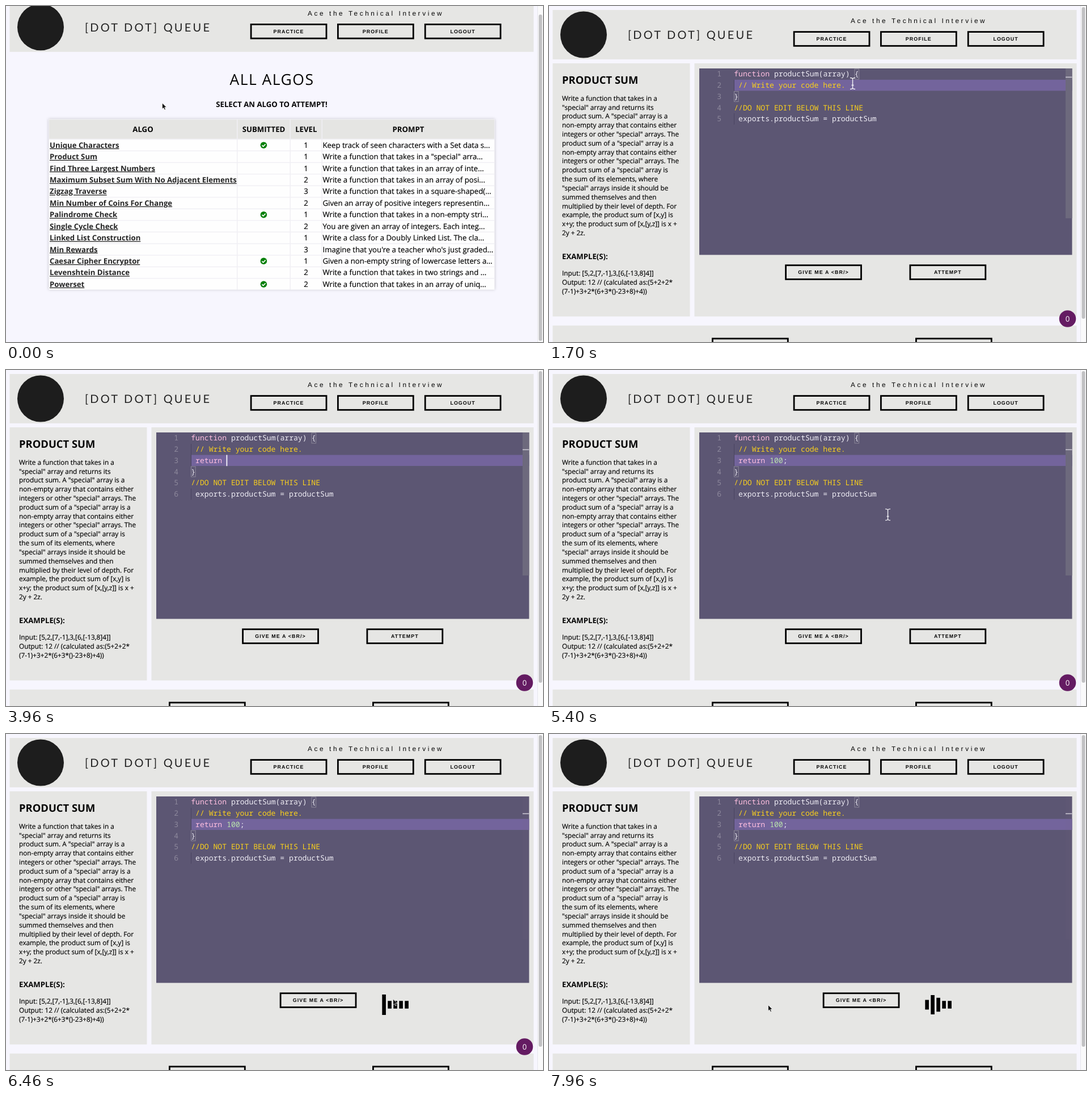
Recreate the animation shown at these times as an HTML page. Size 947 px wide and 592 px high, loop 8000 ms.

```html
<!DOCTYPE html>
<html lang="en">
<head>
<meta charset="utf-8">
<title>All Algos</title>
<style>
html, body { margin: 0; width: 100%; height: 100%; overflow: hidden; background: #f7f6fe; }
svg { display: block; width: 947px; height: 592px; }
text { font-family: "Open Sans", sans-serif; fill: #050505; text-rendering: geometricPrecision; }
.mid { text-anchor: middle; }
.bold { font-weight: 700; }
.body { font-size: 11.8px; }
.cell { font-size: 13.19px; }
.body, .cell:not(.bold) { stroke: #050505; stroke-width: .18px; }
.link { text-decoration: underline; fill: #262626; }
.title { font-size: 26.5px; letter-spacing: 1.5px; }
.h2 { font-size: 18.4px; }
.btn { font: 700 8.84px "Liberation Sans", sans-serif; letter-spacing: 1.1px; }
.slogan { font: 11.8px "Liberation Sans", sans-serif; letter-spacing: 3.61px; }
.brand { font: 20px Lato, sans-serif; letter-spacing: 3.2px; fill: #222; }
.code { font: 13.1px "Noto Sans Mono", monospace; }
.num { text-anchor: end; }
</style>
</head>
<body>
<svg id="stage" viewBox="0 0 947 592"></svg>
<script>
const LOOP = 8000;
const PANEL = '#e6e6e4';
const $ = id => document.getElementById(id);
const esc = s => s.replace(/&/g, '&amp;').replace(/</g, '&lt;');
const rect = (x, y, w, h, fill, more = '') =>
  `<rect x="${x}" y="${y}" width="${w}" height="${h}" fill="${fill}" ${more}/>`;
const text = (x, y, s, cls, more = '') =>
  `<text x="${x}" y="${y}" class="${cls}" ${more}>${esc(s)}</text>`;
const button = (x, y, label) =>
  rect(x + 1.4, y + 1.4, 132.9, 24.7, 'none', 'stroke="#000" stroke-width="2.8"') +
  text(x + 67.8, y + 17, label, 'btn mid');

const header = () =>
  rect(6.5, 7, 924, 87, PANEL) +
  '<circle cx="61" cy="50.5" r="41" fill="#1d1d1d"/>' +
  text(139, 58, '[DOT DOT] QUEUE', 'brand') +
  text(532, 30, 'Ace the Technical Interview', 'slogan') +
  button(430.7, 44.2, 'PRACTICE') + button(584, 44.2, 'PROFILE') + button(737.8, 44.2, 'LOGOUT');

const scrollbar = (y, h) =>
  rect(937, 0, 10, 592, '#fafafb') + rect(937, 0, 1, 592, '#e7e6ec') +
  rect(939.5, y, 6, h, '#c1c1c3', 'rx="3"');

// name, level, prompt, submitted
const algos = [
  ['Unique Characters', 1, 'Keep track of seen characters with a Set data s...', 1],
  ['Product Sum', 1, 'Write a function that takes in a "special" arra...'],
  ['Find Three Largest Numbers', 1, 'Write a function that takes in an array of inte...'],
  ['Maximum Subset Sum With No Adjacent Elements', 2, 'Write a function that takes in an array of posi...'],
  ['Zigzag Traverse', 3, 'Write a function that takes in a square-shaped(...'],
  ['Min Number of Coins For Change', 2, 'Given an array of positive integers representin...'],
  ['Palindrome Check', 1, 'Write a function that takes in a non-empty stri...', 1],
  ['Single Cycle Check', 2, 'You are given an array of integers. Each integ...'],
  ['Linked List Construction', 1, 'Write a class for a Doubly Linked List. The cla...'],
  ['Min Rewards', 3, "Imagine that you're a teacher who's just graded..."],
  ['Caesar Cipher Encryptor', 1, 'Given a non-empty string of lowercase letters a...', 1],
  ['Levenshtein Distance', 2, 'Write a function that takes in two strings and ...'],
  ['Powerset', 2, 'Write a function that takes in an array of uniq...', 1]
];
const columns = [[76, 331, 'ALGO'], [408.5, 92, 'SUBMITTED'], [502, 54.5, 'LEVEL'], [558, 303, 'PROMPT']];

const check = y =>
  `<circle cx="454.4" cy="${y}" r="5.8" fill="#07800a"/>` +
  `<path d="M451.4 ${y + .2}l2.2 2.2 4-4.2" fill="none" stroke="#fff" stroke-width="1.6"/>`;

function listPage() {
  let s = `<g transform="translate(0 -13.2)">${header()}</g>` +
    text(469, 139, 'ALL ALGOS', 'title mid') +
    text(468.5, 177.6, 'SELECT AN ALGO TO ATTEMPT!', 'cell bold mid') +
    rect(75, 199, 787, 300.5, '#f0eff4', 'filter="url(#soft)"');
  for (const [x, w, name] of columns)
    s += rect(x, 200.3, w, 33.5, '#e5e5e3') + text(x + w / 2, 222.2, name, 'cell bold mid');
  algos.forEach(([name, level, prompt, done], i) => {
    const y = 245.2 + 20.42 * i;
    for (const [x, w] of columns) s += rect(x, y - 9.6, w, 19, '#fefefe');
    s += text(77, y + 4.6, name, 'cell bold link') +
      text(529, y + 4.6, String(level), 'cell mid') +
      text(558.5, y + 4.6, prompt, 'cell') + (done ? check(y) : '');
  });
  return s + scrollbar(15, 575);
}

const prompt = `Write a function that takes in a
"special" array and returns its
product sum. A "special" array is a
non-empty array that contains either
integers or other "special" arrays. The
product sum of a "special" array is a
non-empty array that contains either
integers or other "special" arrays. The
product sum of a "special" array is
the sum of its elements, where
"special" arrays inside it should be
summed themselves and then
multiplied by their level of depth. For
example, the product sum of [x,y] is
x+y; the product sum of [x,[y,z]] is x +
2y + 2z.`;
const example = `Input: [5,2,[7,-1],3,[6,[-13,8]4]]
Output: 12 // (calculated as:(5+2+2*
(7-1)+3+2*(6+3*()-23+8)+4))`;
const lines = (y, s) => s.split('\n').map((l, i) => text(23, y + 15.82 * i, l, 'body')).join('');

const editorPage = () =>
  header() + rect(6.5, 101, 242, 446, PANEL) + rect(256.5, 101, 674, 446, PANEL) +
  rect(6.5, 563, 924, 40, PANEL) +
  text(23, 137.3, 'PRODUCT SUM', 'bold h2') + lines(166.7, prompt) +
  text(23, 445.8, 'EXAMPLE(S):', 'cell bold') + lines(475.4, example) +
  rect(265, 110, 657.5, 328.5, '#5c5673') + '<g id="code"></g>' +
  rect(911, 110, 11.5, 264, '#6d697d', 'id="slider"') +
  rect(911, 124.6, 11.5, 1.6, '#c9c6d2', 'id="mark"') +
  rect(0, 0, 1.7, 19.6, '#fff', 'id="caret"') +
  `<g id="give">${button(416.2, 455.4, 'GIVE ME A <BR/>')}</g>` +
  `<g id="attempt">${button(635.5, 455.4, 'ATTEMPT')}</g>` +
  '<path id="bars"/>' +
  button(287, 584.6, '') + button(646, 584.6, '') +
  '<g id="badge"><circle cx="914.5" cy="551" r="14.8" fill="#641b62"/>' +
  text(914.5, 555.6, '0', 'cell mid', 'style="fill:#fff;stroke:none"') + '</g>' +
  scrollbar(2, 549);

const cursors =
  '<path id="arrow" d="M0 0V10.4L2.4 8.3 4.1 12 5.9 11.2 4.3 7.6H7.6Z" fill="#111" stroke="#fff" stroke-width=".7"/>' +
  '<path id="hand" d="M-.9 .4Q0-.8 .9 .4V5L5 5.8Q6.4 6.2 6.2 8L5.3 12.6H-.4L-3 8.2Q-3.2 6.6-.9 8Z" fill="#fff" stroke="#222" stroke-width="1"/>' +
  '<path id="beam" d="M-4.5-10Q-1-10 0-8.5Q1-10 4.5-10M0-8.5V8.5M-4.5 10Q-1 10 0 8.5Q1 10 4.5 10M-2 3H2" fill="none" stroke="#f4f3f7" stroke-width="1.4"/>';

$('stage').innerHTML =
  '<defs><filter id="soft" x="-5%" y="-5%" width="110%" height="110%">' +
  '<feDropShadow dx="0" dy="0" stdDeviation="2.6" flood-opacity=".2"/></filter></defs>' +
  rect(0, 0, 947, 592, '#f7f6fe') +
  `<g id="list">${listPage()}</g><g id="editor">${editorPage()}</g><g id="mouse">${cursors}</g>`;

const PINK = '#ffbfe0', PALE = '#efedf5', GOLD = '#fad01c', LIME = '#b9e3ab';
const colX = c => 326.2 + 7.87 * c;
const lineY = i => 110.2 + 19.72 * i;
const typed = 'return 100;';
const keys = [3230, 3300, 3530, 3630, 3730, 3830, 3960, 4130, 4190, 4430, 4660];
const ENTER = 2830;

// token: column, string, colour
function codeMarkup(split, n) {
  const word = typed.slice(0, Math.min(n, 6));
  const rows = [
    [[0, 'function', PINK], [9, 'productSum(array)', PALE], [27, '{', PALE]],
    [[1, '// Write your code here.', GOLD]],
    [[0, '}', PALE]],
    [[0, '//DO NOT EDIT BELOW THIS LINE', GOLD]],
    [[1, 'exports.productSum = productSum', PALE]]
  ];
  if (split) rows.splice(2, 0, [
    [1, word, n > 5 ? PINK : PALE], [8, typed.slice(7, Math.min(n, 10)), LIME], [11, typed.slice(10, n), PALE]
  ]);
  const active = split ? 2 : 1;
  let s = rect(326, lineY(active), 596.5, 19.4, '#73649c');
  rows.forEach((row, i) => {
    const y = lineY(i);
    s += text(304, y + 14.2, String(i + 1), 'code num', 'style="fill:#8d889c"');
    if (row[0][0] === 1) s += rect(326, y, 1, 19.7, '#494360');
    for (const [c, str, fill] of row) {
      if (str === '{' || str === '}')
        s += rect(colX(c) + .3, y + .8, 7.6, 18, 'none', 'stroke="#8b8798" stroke-width="1"');
      s += text(colX(c), y + 14.2, str, 'code', `style="fill:${fill}"`);
    }
  });
  return s;
}

const clamp = u => Math.max(0, Math.min(1, u));
const smooth = u => u * u * (3 - 2 * u);

// cubic-bezier easing solved by bisection
function bezier(x1, y1, x2, y2, x) {
  const at = (a, b, s) => 3 * (1 - s) * (1 - s) * s * a + 3 * (1 - s) * s * s * b + s * s * s;
  let lo = 0, hi = 1;
  for (let i = 0; i < 20; i++) {
    const m = (lo + hi) / 2;
    if (at(x1, x2, m) < x) lo = m; else hi = m;
  }
  return at(y1, y2, lo);
}

const SPIN = 6290;
function barPath(t) {
  let d = '';
  for (let i = 0; i < 5; i++) {
    const age = t - SPIN - 200 * i;
    const p = age < 0 ? 0 : age % 1200;
    const k = p < 240 ? bezier(.2, .2, .4, .8, p / 240)
      : p < 600 ? 1 - bezier(.2, .6, .4, .8, (p - 240) / 360) : 0;
    const h = 13.3 + 26.7 * k;
    d += `M${663.3 + 10 * i} ${477 - h / 2}h6.6v${h}h-6.6z`;
  }
  return d;
}

// time, x, y, eased
const path = [
  [0, 275.5, 171], [600, 275.5, 171], [960, 275.5, 170], [1330, 275.5, 170], [1660, 163, 253.5, 1],
  [1700, 535.5, 136.5], [5300, 535.5, 136.5], [5400, 597, 254], [5600, 706, 420], [6000, 682.5, 467, 1],
  [6980, 682.5, 467], [7640, 386.5, 477.5, 1], [LOOP, 386.5, 477.5]
];
function mouseAt(t) {
  const i = path.findIndex(p => p[0] > t);
  const a = path[i - 1], b = path[i];
  if (b[0] === 1700) return [a[1], a[2]];
  let u = (t - a[0]) / (b[0] - a[0]);
  if (b[3]) u = smooth(u);
  return [a[1] + (b[1] - a[1]) * u, a[2] + (b[2] - a[2]) * u];
}
function cursorKind(t, x, y) {
  if (t < 1700) return t < 1590 ? 'arrow' : 'hand';
  if (t < 1800) return 'beam';
  if (t < 5300) return '';
  if (y < 438) return 'beam';
  return t < SPIN && x > 635 && y > 455 ? 'hand' : 'arrow';
}

const show = (id, on) => $(id).setAttribute('display', on ? 'inline' : 'none');
const set = (id, attrs) => { for (const k in attrs) $(id).setAttribute(k, attrs[k]); };
let state = '';

function draw(t) {
  const coding = t >= 1700, split = t >= ENTER, spin = t >= SPIN;
  show('list', !coding);
  show('editor', coding);

  const n = keys.filter(k => k <= t).length;
  if (state !== split + '/' + n) {
    state = split + '/' + n;
    $('code').innerHTML = codeMarkup(split, n);
  }
  const lit = t >= 1800 && t < 2300 || t >= 2800 && t < 5130 || t >= 5630 && t < 6130;
  show('caret', lit);
  set('caret', { x: colX(split ? 1 + n : 26) - .6, y: lineY(split ? 2 : 1) });

  const settled = t >= 2960;
  set('slider', { height: settled ? 252 : 264, opacity: 1 - .93 * clamp((t - 5600) / 860) });
  set('mark', { y: settled ? 139.6 : 124.6 });

  set('give', { transform: `translate(${spin ? 66.5 : 0} 0)` });
  show('attempt', !spin);
  show('bars', spin);
  set('bars', { d: barPath(t) });
  show('badge', t < 7360);

  const [x, y] = mouseAt(t), kind = cursorKind(t, x, y);
  set('mouse', { transform: `translate(${x} ${y})` });
  for (const k of ['arrow', 'hand', 'beam']) show(k, k === kind);
}

const start = performance.now();
function tick() {
  draw((performance.now() - start) % LOOP);
  requestAnimationFrame(tick);
}
tick();
</script>
</body>
</html>
```
